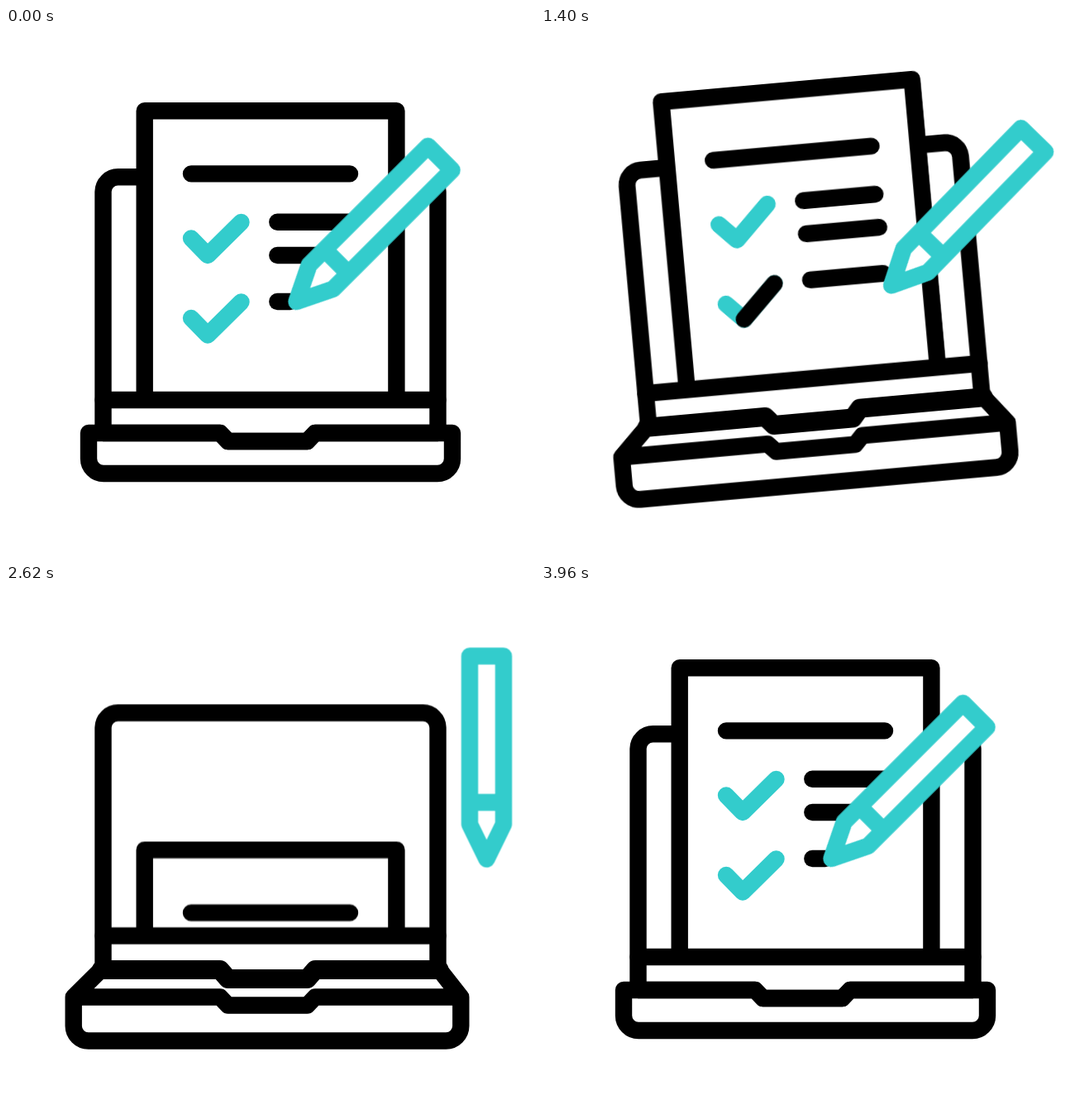
Animation of 640 by 640 pixels, one loop 4.42 s. Source, as an HTML page:

```html
<!DOCTYPE html>
<html lang="en">
<head>
<meta charset="utf-8">
<title>Checklist on a laptop</title>
<style>
  html, body { margin: 0; width: 100%; height: 100%; overflow: hidden; background: #fff; }
  svg {
    display: block; width: 100vw; height: 100vh;
    fill: none; stroke: #000; stroke-width: 20.4px;
    stroke-linecap: round; stroke-linejoin: round;
    --sine: cubic-bezier(.37, 0, .63, 1);
  }
  .white { fill: #fff; }
  .teal { stroke: #33cccc; }

  .rock, .lid, .sheet, .line, .front, .hinge, .pen {
    animation: 4420ms var(--sine) infinite;
  }
  .rock { transform-origin: 320px 331px; animation-name: rock; }
  .lid { animation-name: lift; }
  .sheet { animation-name: sink; }
  .line { animation-name: line; }
  .front { animation-name: front; }
  .hinge { animation-name: hinge; }
  .pen { animation-name: pen; }
  .ink { opacity: 0; animation: ink 4420ms linear infinite; }
  .late { animation-delay: 510ms; }

  @keyframes rock {
    0%, 6.561% { transform: rotate(0deg); }
    16.742% { transform: rotate(6deg); }
    29.412% { transform: rotate(-6deg); }
    40.724% { transform: rotate(3.1deg); }
    54.299%, 100% { transform: rotate(0deg); }
  }
  @keyframes lift {
    0%, 77.828%, 100% { transform: translateY(0); }
    11.765%, 63.348% { transform: translateY(-25.6px); }
  }
  @keyframes sink {
    0%, 38.281% { transform: translateY(0); }
    56.833% { transform: translateY(270px); }
    69.457%, 100% { transform: translateY(0); }
  }
  /* The last line grows and shrinks with the pen tip. */
  @keyframes line {
    0%, 89.593%, 100% { d: path("M328.3 331 L344 331"); }
    13.575%, 80.543% { d: path("M328.3 331 L416.5 331"); }
  }
  /* The base opens towards the viewer. */
  @keyframes front {
    0%, 77.828%, 100% {
      d: path("M100 490 H259 L268.5 500 H364.5 L374 490 H540 V521 A18 18 0 0 1 522 539 H118 A18 18 0 0 1 100 521 Z M100 490 L117.5 490 M540 490 L522.5 490");
    }
    11.765%, 63.348% {
      d: path("M81.7 498.5 H259 L268.5 508.5 H364.5 L374 498.5 H550.3 V533.5 A18 18 0 0 1 532.3 551.5 H99.7 A18 18 0 0 1 81.7 533.5 Z M81.7 498.5 L115.5 465 M550.3 498.5 L524 465");
    }
  }
  @keyframes hinge {
    0%, 77.828%, 100% {
      d: path("M117.5 490 H259 L268.5 500 H364.5 L374 490 H522.5");
      stroke-width: 20.4px;
    }
    11.765%, 63.348% {
      d: path("M115.5 465.5 H259 L268.5 476.5 H364.5 L374 465.5 H524");
      stroke-width: 23px;
    }
  }
  @keyframes pen {
    0% { transform: translate(351.5px, 331px) rotate(45deg); }
    13.575% { transform: translate(431px, 320px) rotate(45deg); }
    19.457% { transform: translate(424.5px, 311.8px) rotate(45deg); }
    30.52% { transform: translate(421.5px, 311px) rotate(45deg); }
    44.86% { transform: translate(581.5px, 331.5px) rotate(0deg); }
    61.086% {
      transform: translate(581.5px, 331.5px) rotate(0deg);
      animation-timing-function: cubic-bezier(.25, .28, .55, 1);
    }
    75.566%, 80.543% { transform: translate(431.5px, 331px) rotate(45deg); }
    89.593%, 100% { transform: translate(351.5px, 331px) rotate(45deg); }
  }
  /* A black stroke runs along the tick and clears from its start. */
  @keyframes ink {
    0%, 14.02% { opacity: 0; stroke-dasharray: 0 3; stroke-dashoffset: 0; }
    14.03% { opacity: 1; stroke-dasharray: 0 3; stroke-dashoffset: 0; }
    17.873% { stroke-dasharray: .68 3; stroke-dashoffset: 0; }
    19.683% { stroke-dasharray: .733 3; stroke-dashoffset: -.267; }
    24.65% { opacity: 1; stroke-dasharray: 0 3; stroke-dashoffset: -1; }
    24.661%, 100% { opacity: 0; stroke-dasharray: 0 3; stroke-dashoffset: -1; }
  }
</style>
</head>
<body>
<svg viewBox="0 0 640 640">
  <defs>
    <clipPath id="slot"><rect x="0" y="-200" width="640" height="650"/></clipPath>
    <path id="tick" pathLength="1" d="M224 254.5 L244 275 L284.5 235"/>
  </defs>

  <g class="rock">
    <g class="lid">
      <path class="white" d="M117.5 490 V198 A18 18 0 0 1 135.5 180.3 H504.5 A18 18 0 0 1 522.5 198 V490"/>
      <g clip-path="url(#slot)">
        <g class="sheet">
          <path class="white" d="M167.7 480 V100.3 H472.4 V480"/>
          <path d="M224 176.4 H416 M328.3 234.7 H415.5 M328.3 275 H416.5"/>
          <path class="line" d="M328.3 331 L344 331"/>
          <use class="teal" href="#tick"/>
          <use class="teal" href="#tick" y="96.5"/>
          <use class="ink" href="#tick"/>
          <use class="ink late" href="#tick" y="96.5"/>
        </g>
      </g>
      <path d="M117.5 450 H522.5"/>
    </g>
    <path class="front white" d="M100 490 H540 V539 H100 Z"/>
    <path class="hinge" d="M117.5 490 H522.5"/>
  </g>

  <!-- The pen stands on its tip at the local zero point. -->
  <g class="pen">
    <path class="teal white" d="M-20.5 -245.5 H20.5 V-42 L0 0 L-20.5 -42 Z M-20.5 -68.5 H20.5"/>
  </g>
</svg>
</body>
</html>
```
